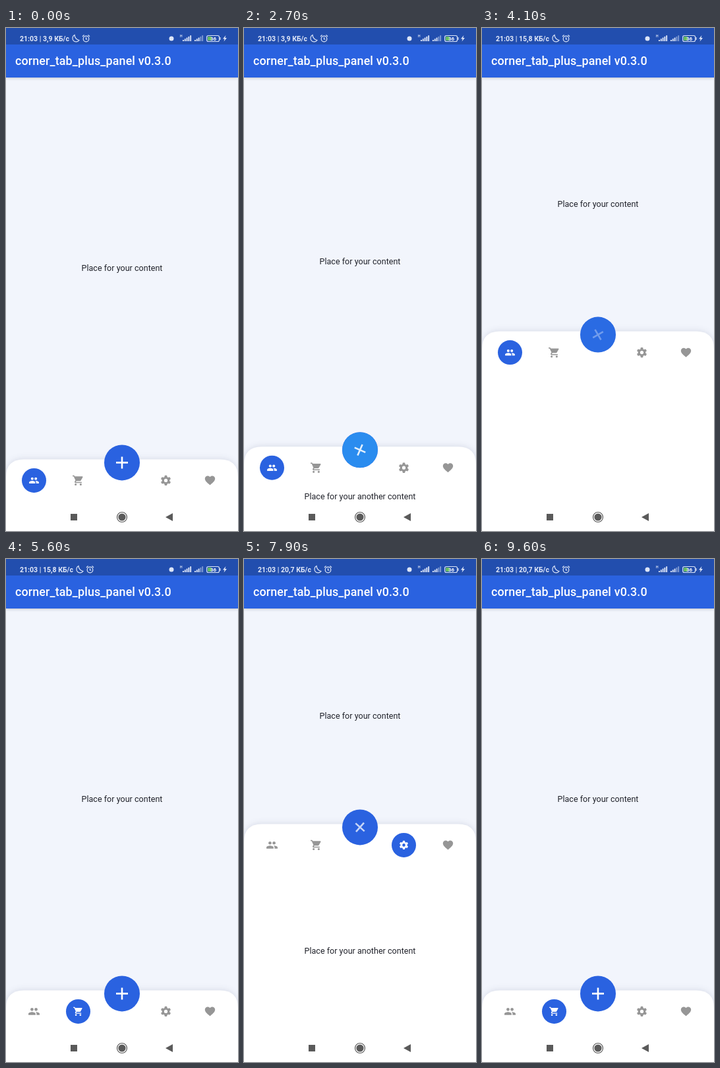
Animation of 352 by 762 pixels, one loop 9.7 s. Source, as an HTML page:

```html
<!DOCTYPE html>
<html lang="en">
<head>
<meta charset="utf-8">
<title>Expanding bottom panel</title>
<style>
html, body { margin: 0; width: 100%; height: 100%; overflow: hidden; background: #f2f5fc; }
svg { display: block; width: 100%; height: 100%; font-family: Roboto, "Open Sans", sans-serif; }
.body { font-size: 12.5px; letter-spacing: .03px; text-anchor: middle; fill: #20222a; }
.title { font-size: 17.9px; font-weight: 500; letter-spacing: .13px; fill: #fff; }
.status { font-size: 10.5px; font-weight: 700; fill: #e3eafa; }
.line { fill: none; stroke: #dce5f8; stroke-width: 1.2; }
#panel { filter: drop-shadow(0 -1px 5px rgba(30, 40, 80, .12)); }
#appbar { filter: drop-shadow(0 1px 2px rgba(0, 0, 0, .2)); }
</style>
</head>
<body>
<svg viewBox="0 0 352 762">
  <defs>
    <g id="people">
      <circle cx="-4" cy="-4" r="3"/><circle cx="4" cy="-4" r="3"/>
      <path d="M-4 1c-2.3 0-7 1.2-7 3.5V7H3V4.5C3 2.2-1.7 1-4 1zM4 1l-1 .1c1.2.8 2 1.9 2 3.4V7h6V4.5C11 2.2 6.3 1 4 1z"/>
    </g>
    <g id="cart">
      <circle cx="-5" cy="8" r="2"/><circle cx="5" cy="8" r="2"/>
      <path d="M-11-10v2h2l3.6 7.6-1.4 2.4C-7.5 3.4-6.5 5-5 5H7V3H-4.6l.9-2H3.6c.7 0 1.4-.4 1.7-1L9-6.5c.3-.7-.2-1.5-1-1.5H-6.8l-.9-2z"/>
    </g>
    <g id="gear">
      <circle r="5.4" fill="none" stroke="currentColor" stroke-width="4"/>
      <g id="teeth"></g>
    </g>
    <path id="heart" d="M0 9.3l-1.4-1.3C-6.6 3.4-10 .3-10-3.5-10-6.6-7.6-9-4.5-9-2.8-9-1.1-8.2 0-6.9 1.1-8.2 2.8-9 4.5-9 7.6-9 10-6.6 10-3.5 10 .3 6.6 3.4 1.4 8z"/>
    <clipPath id="disc"><circle r="27"/></clipPath>
  </defs>

  <rect width="352" height="762" fill="#f2f5fc"/>
  <text id="content" class="body" x="176">Place for your content</text>

  <g id="appbar"><rect width="352" height="75" fill="#2a62e0"/></g>
  <rect width="352" height="25" fill="#224eae"/>
  <text class="title" x="14" y="56">corner_tab_plus_panel v0.3.0</text>

  <text id="net" class="status" x="21" y="20"></text>
  <g id="modes" class="line">
    <path d="M104 10.5a5.5 5.5 0 1 0 7 8a9 9 0 0 1-7-8z"/>
    <circle cx="121.5" cy="16.5" r="4.3"/>
    <path d="M121.5 14v3h2M116 13l2.5-2.5M127 13l-2.5-2.5"/>
  </g>
  <circle cx="251" cy="16" r="3.5" fill="#dce5f8"/>
  <text x="264" y="14" font-size="5" font-weight="700" fill="#dce5f8">H</text>
  <g id="signal" fill="#dce5f8"></g>
  <rect class="line" x="304.6" y="11.5" width="19" height="9" rx="2.5"/>
  <rect x="306" y="13" width="6" height="6" rx="1" fill="#68bd62"/>
  <path d="M325 14v4" class="line"/>
  <text x="314.5" y="19" font-size="8" font-weight="700" text-anchor="middle" fill="#fff">36</text>
  <path d="M333.5 11l-4.5 5.5h2.7l-1.2 4 4.5-5.5h-2.7z" fill="#e3eafa"/>

  <g id="panel"><path id="sheet" fill="#fff"/></g>
  <text id="other" class="body" x="176">Place for your another content</text>
  <g id="tabs"></g>
  <g id="button">
    <circle r="27" fill="#2a62e0"/>
    <g clip-path="url(#disc)"><circle id="splash" fill="#2b95f2"/></g>
    <path id="plus" d="M-9 0H9M0-9V9" stroke="#fff" stroke-width="2.6"/>
  </g>

  <rect y="719" width="352" height="43" fill="#fff"/>
  <g fill="#5a5a5a">
    <rect x="98" y="736" width="10" height="10"/>
    <circle cx="176" cy="741" r="5.6"/>
    <circle cx="176" cy="741" r="7.5" fill="none" stroke="#5a5a5a" stroke-width="1.2"/>
    <path d="M242 741l11-6v12z"/>
  </g>
</svg>
<script>
const LOOP = 9700, STEP = 100, SLIDE = 500, TRAVEL = 291;
const $ = id => document.getElementById(id);
const set = (el, attrs) => { for (const k in attrs) el.setAttribute(k, attrs[k]); };
const clamp = v => Math.max(0, Math.min(1, v));

// Opening and closing times of the panel
const visits = [[267, 1133], [2667, 3933], [7467, 8600]];
// Time, selected tab
const picks = [[0, 0], [5100, 1], [5800, 2], [6000, 3], [6300, 2], [6500, 1], [6700, 0], [7100, 2], [9200, 1]];
const speeds = [[0, "3,9"], [3500, "15,8"], [7400, "20,7"]];
const at = (list, t) => list.filter(e => e[0] <= t).pop()[1];

$("teeth").innerHTML = [0, 60, 120, 180, 240, 300].map(a =>
  `<path d="M-3-6.500L-2-10H2L3-6.500z" transform="rotate(${a})"/>`).join("");

$("signal").innerHTML = [268, 286].map((x, n) => [0, 1, 2, 3, 4].map(i =>
  `<rect x="${x + i * 2.8}" y="${18 - i * 1.7}" width="1.9" height="${2 + i * 1.7}" opacity="${n && i > 2 ? .5 : 1}"/>`
).join("")).join("");

const tabs = ["people", "cart", "gear", "heart"].map((name, i) => {
  const x = [42.5, 109.5, 242.5, 309.5][i];
  $("tabs").insertAdjacentHTML("beforeend",
    `<g transform="translate(${x})"><circle r="18.5" fill="#2a62e0"/><use href="#${name}"/></g>`);
  return $("tabs").lastElementChild.children;
});

function draw(t) {
  let open = 0, rising = false, splash = 0, glow = 0;
  for (const [start, end] of visits) {
    open += clamp((t - start) / SLIDE) - clamp((t - end) / SLIDE);
    rising = rising || (t >= start && t < end);
    for (const tap of [start, end]) {
      const d = t - tap;
      if (d > -170 && d < 200) {
        splash = 27 * clamp((d + 190) / 190);
        glow = d < 0 ? 1 : 1 - d / 200;
      }
    }
  }
  const y = 685.4 - TRAVEL * open, top = y - 32;

  set($("content"), { y: 368 - TRAVEL * open / 2 });
  set($("other"), { y: (y + 34 + 719) / 2 + 4.6, opacity: rising ? 1 : 0 });
  set($("sheet"), { d: `M0 762V${top + 27}Q0 ${top} 27 ${top}H325Q352 ${top} 352 ${top + 27}V762z` });
  set($("tabs"), { transform: `translate(0 ${y})` });
  set($("button"), { transform: `translate(176 ${y - 27})` });
  set($("splash"), { r: splash, opacity: glow });
  set($("plus"), { transform: `rotate(${360 * open})`, opacity: Math.abs(1 - 2 * open) });

  const picked = at(picks, t);
  tabs.forEach(([disc, icon], i) => {
    const on = i === picked, color = on ? "#fff" : "#969696";
    set(disc, { opacity: on ? 1 : 0 });
    set(icon, { fill: color, color, transform: `scale(${on ? .67 : .77})` });
  });

  const speed = at(speeds, t);
  $("net").textContent = `21:03 | ${speed} КБ/с`;
  set($("modes"), { transform: `translate(${speed.length > 3 ? 6 : 0})` });
}

const begin = performance.now();
function tick() {
  const t = (performance.now() - begin) % LOOP;
  draw(Math.floor(t / STEP) * STEP);
  requestAnimationFrame(tick);
}
draw(0);
requestAnimationFrame(tick);
</script>
</body>
</html>
```
